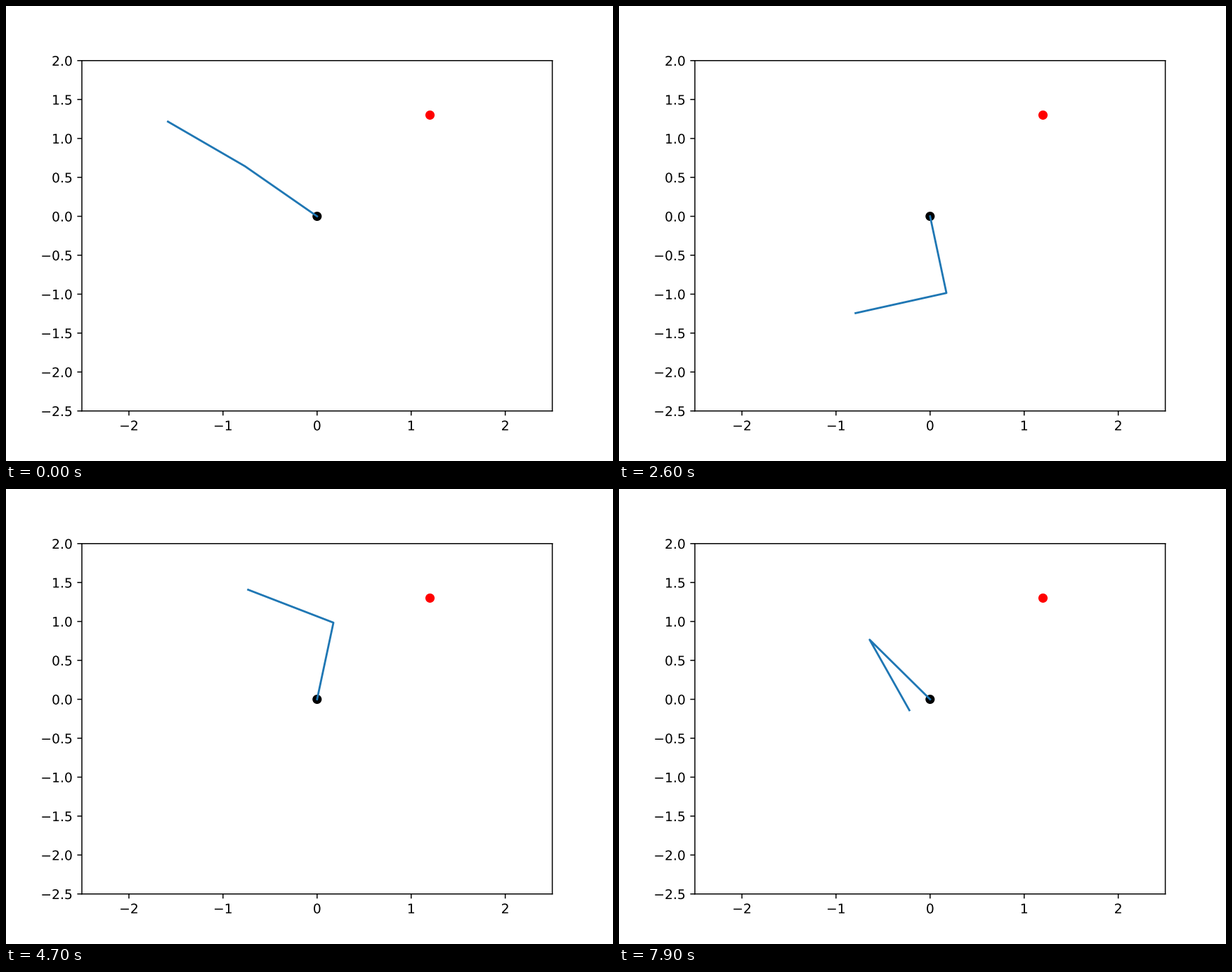
A matplotlib script that plays this animation: 864x648 px, repeating every 8000 ms.

```python
import numpy as np
import matplotlib.pyplot as plt
from matplotlib import patheffects
from matplotlib.animation import FuncAnimation

FRAMES, INTERVAL = 80, 100
STEP = 10  # both joints turn in whole steps of this many degrees
GOAL = (1.2, 1.3)

# (frame, degrees): steady clockwise turning with short hesitations.
SHOULDER = [(0, 140), (8, 60), (9, 70), (13, 50), (32, -140), (33, -140),
            (51, -320), (52, -320), (79, -590)]
ELBOW = [(0, 5), (7, 35), (9, 15), (12, 25), (16, 15), (34, -165),
         (35, -165), (50, -315), (54, -335), (58, -375), (62, -395),
         (65, -425), (66, -425), (79, -555)]


def stepped(keys, i):
    """Angle on the line between key points, held to whole steps."""
    frames, angles = zip(*keys)
    start = angles[0]
    turn = np.interp(i, frames, angles) - start
    return start + STEP * np.round(turn / STEP)


def arm_points(i):
    shoulder = stepped(SHOULDER, i)
    a = np.radians([shoulder, shoulder + stepped(ELBOW, i)])
    x = np.append(0, np.cumsum(np.cos(a)))
    y = np.append(0, np.cumsum(np.sin(a)))
    return x, y


# Draw lines, markers and text at sub-pixel positions.
plt.rcParams["path.effects"] = [patheffects.Stroke(snap=False)]
plt.rcParams["text.hinting"] = "none"

fig, ax = plt.subplots(figsize=(6.4, 4.8), dpi=135)
fig.subplots_adjust(left=0.125, right=0.9, bottom=0.11, top=0.88)
ax.set_xlim(-2.5, 2.5)
ax.set_ylim(-2.5, 2.0)
ax.set_xticks(np.arange(-2, 3))
ax.set_yticks(np.arange(-2.5, 2.1, 0.5))

ax.plot(0, 0, "o", color="black")
ax.plot(*GOAL, "o", color="red")
arm, = ax.plot([], [], color="C0", lw=1.5)


def update(i):
    arm.set_data(*arm_points(i))
    return arm,


anim = FuncAnimation(fig, update, frames=FRAMES, interval=INTERVAL,
                     repeat=True, repeat_delay=0)
plt.show()
```
